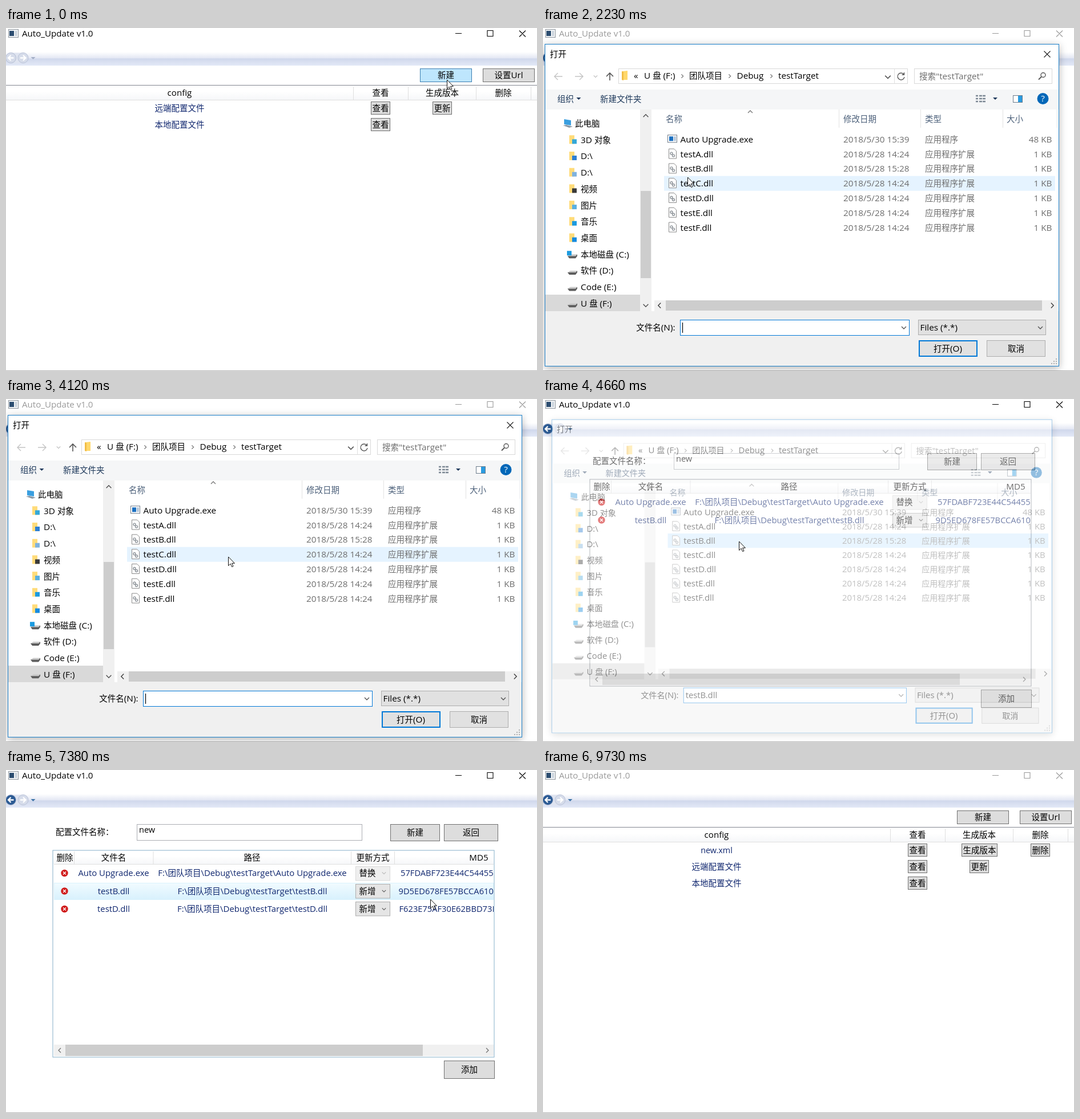
Recreate the animation shown at these times as an HTML page. Size 930 px wide and 602 px high, loop 9810 ms.

```html
<!DOCTYPE html>
<html lang="zh-CN">
<head>
<meta charset="utf-8">
<title>Auto_Update</title>
<style>
html,body{margin:0;width:100%;height:100%;overflow:hidden;background:#fff}
svg{display:block;width:100vw;height:100vh}
text{font:15.1px "Open Sans","Noto Sans CJK SC",sans-serif;white-space:pre}
#dialog text{font-size:15.3px}
.c{font:14.5px "Noto Sans CJK SC","Noto Sans CJK",sans-serif}
.m{text-anchor:middle}
.e{text-anchor:end}
.navy{fill:#10276f}
#editor .navy{font-size:14.9px}
#editor .hash{font-size:14.7px}
.gray{fill:#6d6d6d}
.head{fill:#4c607a}
.tool{fill:#1e395b}
.btn rect{fill:#ddd;stroke:#707070}
.btn.hot rect{fill:#bee6fd;stroke:#3c7fb1}
.combo rect{fill:#e5e5e5;stroke:#acacac}
.combo.hot rect{fill:#dcecfc;stroke:#7eb4ea}
.off rect{fill:#efefef;stroke:#d9d9d9}
.row>rect{fill:none}
.row.hot>rect{fill:url(#glow);stroke:#d9f1fc}
</style>
</head>
<body>
<svg id="stage" viewBox="0 0 930 602" preserveAspectRatio="none"></svg>
<script>
const LOOP = 9810;
const stage = document.getElementById('stage');

// ---- drawing helpers ----
const text = (x, cy, s, cls = '', extra = '') =>
  `<text x="${x}" y="${cy + 5.4}" class="${cls}" ${extra}>` +
  s.replace(/[\u4e00-\u9fff\uff1a]+/g, '<tspan class="c">$&</tspan>') + '</text>';
const box = (x, y, w, h, fill, stroke = 'none', extra = '') =>
  `<rect x="${x}" y="${y}" width="${w}" height="${h}" fill="${fill}" stroke="${stroke}" ${extra}/>`;
const line = (d, color = '#dfdfdf', w = 1) =>
  `<path d="${d}" fill="none" stroke="${color}" stroke-width="${w}"/>`;
const chev = (x, y, turn = 0, color = '#505050', k = 1) =>
  `<path d="M-4-2L0 2L4-2" transform="translate(${x} ${y}) rotate(${turn}) scale(${k})" fill="none" stroke="${color}" stroke-width="1.3"/>`;
const tri = (x, y, color, id = '') =>
  `<path ${id && `id="${id}"`} d="M${x - 4} ${y - 2}h8l-4 4z" fill="${color}"/>`;
const btn = (x, y, w, h, label) =>
  `<g class="btn">${box(x + .5, y + .5, w, h, '')}${text(x + w / 2 + .5, y + h / 2 + .5, label, 'm')}</g>`;

// ---- main window ----
const frame = () => `
  ${box(0, 0, 930, 602, '#fff')}
  ${box(4.5, 2.5, 17, 14, '#f1f3f5', '#8d959d')}${box(6, 5, 8, 9, '#2c4d70')}${box(16, 5, 3, 9, '#c6d0da')}
  <g id="caption">${text(28, 10, 'Auto_Update v1.0')}
    <path d="M787 9.5h11M843 4.5h10v10h-10zM899 4.5l11 11M910 4.5l-11 11" fill="none" stroke-width="1.1"/></g>
  ${box(0, 42, 930, 24, 'url(#band)')}
  ${box(8, 43.5, 23, 18, '#dfe4f0')}
  <g id="back" transform="translate(8.5 52.5)" stroke="#b3bdd4"><circle r="9"/>${line('M5 0H-4M0-4.5L-4.5 0L0 4.5', '#fff', 2.3)}</g>
  <g transform="translate(30 52.5)"><circle r="9" fill="#d6dcea" stroke="#b9c2d8"/>${line('M-5 0H4M0-4.5L4.5 0L0 4.5', '#fff', 2.3)}</g>
  ${tri(47.5, 53, '', 'drop')}
  ${box(0, 601, 930, 1, '#b4b4b4')}`;

function listPage(id, rows) {
  const cols = [0, 656, 764, 871];
  let s = `<g id="${id}">${btn(725, 71, 90, 23, '新建')}${btn(835, 71, 90, 23, '设置Url')}
    ${line('M0 100.5H930', '#828790')}${box(0, 101, 930, 25, 'url(#bar)')}
    ${line('M0 126.5H930M608.5 103V126M704.5 103V126M823.5 103V126M919.5 103V126')}
    ${text(304, 114, 'config', 'm')}${text(656, 114, '查看', 'm')}${text(764, 114, '生成版本', 'm')}${text(871, 114, '删除', 'm')}`;
  rows.forEach(([name, ...acts], i) => {
    const y = 141 + Math.floor(i * 29.4);
    s += text(304, y, name, 'm navy', /xml/.test(name) ? 'style="font-size:14.4px"' : '');
    acts.forEach((a, j) => {
      const w = a.length > 2 ? 62 : 33;
      s += btn(Math.floor(cols[j + 1] - w / 2), y - 12, w, 22, a);
    });
  });
  return s + '</g>';
}

const DIR = 'F:\\团队项目\\Debug\\testTarget\\';
const ITEMS = [
  ['Auto Upgrade.exe', '替换', '57FDABF723E44C54455E', 691],
  ['testB.dll', '新增', '9D5ED678FE57BCCA610', 687.5],
  ['testD.dll', '新增', 'F623E75AF30E62BBD73E', 688.5]
];

function itemRow([name, mode, hash, hx], i) {
  const y = 181 + i * 31.5, top = 169 + i * 31, off = i === 0;
  return `<g class="row" id="item${i}">${box(84.5, top - 1.5, 769, 29, '')}
    <circle class="del" cx="102.5" cy="${y}" r="6.2"/>${line(`M100 ${y - 2.5}l5 5m0-5l-5 5`, '#fff', 1.4)}
    ${text(188.5, y, name, 'm navy')}${text(431.5, y, DIR + name, 'm navy')}
    <g class="combo ${off ? 'off' : ''}">${box(612.5, top + .5, 60, 24.5, '')}${text(618.5, y, mode)}
    ${chev(662, y, 0, off ? '#b5b5b5' : '#505050', .8)}</g>
    <g clip-path="url(#cell)">${text(hx, y, hash, 'navy hash', `id="hash${i}"`)}</g></g>`;
}

const editor = () => `<g id="editor">
  ${text(87, 109, '配置文件名称：')}
  ${box(229.5, 95.5, 394, 28, '#fff', '#abadb3', 'id="field"')}
  ${text(233, 105, '', '', 'id="value" style="font-size:14.5px"')}
  <path id="caret" d="M0 98v15" stroke="#000"/>
  ${btn(673, 95, 86, 29, '新建')}${btn(767, 95, 94, 29, '返回')}
  ${box(82, 141, 773, 363, '#fff', '', 'id="table"')}
  ${box(83, 142, 771, 23, 'url(#bar)')}${line('M84 165.5H854')}
  ${text(103, 154, '删除', 'm')}
  <g id="bare">${line('M119.5 143V165M178.5 143V165M221.5 143V165M294.5 143V165M340.5 143V165')}
    ${text(149, 154, '文件名', 'm')}${text(200, 154, '路径', 'm')}${text(258, 154, '更新方式', 'm')}${text(317, 154, 'MD5', 'm')}</g>
  <g id="filled">${line('M119.5 143V165M258 143V165M604.5 143V165M680.5 143V165')}
    ${text(188.5, 154, '文件名', 'm')}${text(431, 154, '路径', 'm')}${text(642.5, 154, '更新方式', 'm')}${text(828, 154, 'MD5', 'm', 'id="md"')}
    ${box(84, 482, 770, 20, '#f0f0f0')}${box(104, 482, 626, 20, '#cdcdcd', 'none', 'id="thumb"')}
    ${chev(94, 492, 90, '#707070')}${chev(843, 492, -90, '#707070')}</g>
  ${ITEMS.map(itemRow).join('')}
  ${btn(767, 510, 88, 31, '添加')}</g>`;

// ---- file dialog ----
const FILES = ['Auto Upgrade.exe', ...[...'ABCDEF'].map(c => `test${c}.dll`)];
const rowY = i => 195.3 + i * 25.8;

function fileRow(name, i) {
  const y = rowY(i), app = i === 0;
  const icon = app
    ? box(218.5, y - 7.5, 16, 13, '#fff', '#6f7b88') + box(221, y - 5, 7, 8, '#1b6fc0') + box(229, y - 5, 4, 8, '#b5c7da')
    : `<path d="M220.5 ${y - 9}h9l4 4v13h-13z" fill="#fff" stroke="#8a8a8a"/>` +
      `<g fill="none" stroke="#8a9096" stroke-width="1.4"><circle cx="225" cy="${y - 1}" r="2"/><circle cx="228.5" cy="${y + 3}" r="2"/></g>`;
  const time = app ? '30 15:39' : i === 2 ? '28 15:28' : '28 14:24';
  return `<rect class="file" x="212" y="${y - 13}" width="685" height="26"/>${icon}
    ${text(240.5, y, name)}${text(526, y, '2018/5/' + time, 'gray')}
    ${text(669, y, app ? '应用程序' : '应用程序扩展', 'gray')}${text(891.5, y, app ? '48 KB' : '1 KB', 'e gray')}`;
}

function sidebar() {
  const tints = ['#35a8d8', '#2d7fd3', '#7fb2de', '#3a3a3a', '#5ab0e0', '#1b9ae0', '#168be0'];
  const names = ['3D 对象', 'D:\\', 'D:\\', '视频', '图片', '音乐', '桌面', '本地磁盘 (C:)', '软件 (D:)', 'Code (E:)', 'U 盘 (F:)'];
  let s = box(4, 468, 166, 29, '#d9d9d9') + text(56, 167.5, '此电脑') +
    `<path d="M37 160l12 2v9l-12-2z" fill="#3a9fe0"/><path d="M35 171l6-1 11 3-6 2z" fill="#8a98a5"/>`;
  names.forEach((n, i) => {
    const y = 196.3 + i * 28.7;
    s += text(66, y, n);
    s += i < 7
      ? box(46, y - 8, 9, 15, '#ffdc7a') + box(51, y - 1, 8, 8, tints[i])
      : `<path d="M43 ${y + 3}l5-3h12l-3 3z" fill="#c9c9c9"/><path d="M43 ${y + 3}l3 4h11l3-4v-3l-3 3z" fill="#5d5d5d"/>` +
        (i === 7 ? box(42, y - 6, 8, 8, '#1c9be0') : '');
  });
  return s;
}

const dialog = () => `<g id="dialog">
  ${box(3.5, 28.5, 900, 565, '#fff', '#1f7fc8', 'filter="url(#shade)"')}
  ${text(12, 46, '打开')}<g id="cross">${line('M877.5 40.5l11 11m0-11l-11 11', '#222', 1.2)}</g>
  ${line('M34 85H20m6-6l-6 6l6 6M56 85h14m-6-6l6 6l-6 6', '#c4c4c4', 1.4)}${chev(92, 85, 0, '#b5b5b5', .8)}
  ${line('M117 92V79m-6 6l6-6l6 6', '#555', 1.6)}
  ${box(132.5, 71.5, 506, 26, '#fff', '#d9d9d9')}${line('M615.5 72V97')}
  <path d="M138 76l10-1v16h-10z" fill="#ffd86b"/><path d="M138 76l3 1v15l-3-1z" fill="#f2bd45"/>
  ${text(159, 84, '«')}${text(177, 84, 'U 盘 (F:)')}${text(256, 84, '团队项目')}${text(339.5, 84, 'Debug')}${text(412, 84, 'testTarget')}
  ${[244, 327, 400].map(x => chev(x, 84.5, -90, '#555', .8)).join('')}${chev(604, 86, 0, '#555', 1.2)}
  ${line('M632 81.5A6 6 0 1 0 633 86M632.5 78v4h-4', '#555', 1.4)}
  ${box(650.5, 71.5, 241, 26, '#fff', '#d9d9d9')}${text(659, 84.5, '搜索"testTarget"', 'gray')}
  <circle cx="876" cy="82.5" r="4" fill="none" stroke="#555" stroke-width="1.4"/>${line('M873 85.5l-5 5', '#555', 1.8)}
  ${box(4, 108, 899, 35, '#f5f6f7')}
  ${text(25, 124.5, '组织', 'tool')}${tri(62.5, 124, '#1e395b')}${text(100, 124.5, '新建文件夹', 'tool')}
  ${[119, 124, 129].map(y => line(`M758 ${y}h4m2 0h5m1 0h5`, '#7c8894', 2.4)).join('')}${tri(792, 124, '#1e395b')}
  ${box(823.5, 118.5, 16, 12, '#fff', '#6d7d8c')}${box(832, 119, 7, 11, '#2a9be0')}
  <circle cx="875.5" cy="124" r="10" fill="#0067b8"/>${text(875.5, 124, '?', 'm', 'fill="#fff" font-weight="600"')}
  ${sidebar()}
  ${box(170, 143, 20, 354, '#f0f0f0')}${box(171, 286, 18, 153, '#cdcdcd')}
  ${chev(180, 154, 180, '#505050', 1.1)}${chev(180, 487, 0, '#505050', 1.1)}
  ${line('M518.5 143V175M661.5 143V175M805.5 143V175M900.5 143V175', '#e3e3e3')}${chev(363, 147, 180, '#777')}
  ${text(215, 159.5, '名称', 'head')}${text(526, 159.5, '修改日期', 'head')}${text(669, 159.5, '类型', 'head')}${text(812, 159.5, '大小', 'head')}
  ${FILES.map(fileRow).join('')}
  ${box(195, 478, 707, 19, '#f0f0f0')}${box(215, 478, 659, 18, '#cdcdcd')}
  ${chev(204, 487, 90, '#404040', 1.1)}${chev(892, 487, -90, '#404040', 1.1)}
  ${box(4, 497, 899, 96, '#f0f0f0')}
  ${text(231.5, 526, '文件名(N):', 'e')}
  ${box(240.5, 512.5, 401, 27, '#fff', '#0078d7')}${chev(632, 526)}
  ${text(244, 526, '', '', 'id="picked"')}<path id="dlgCaret" d="M244.5 517v18" stroke="#000" stroke-width="1.2"/>
  ${box(657.5, 512.5, 223, 26, '#e1e1e1', '#adadad')}${text(660.5, 526, 'Files (*.*)')}${chev(871, 526)}
  ${box(659, 549, 101, 27, '#e1e1e1', '#0078d7', 'stroke-width="2"')}${text(709, 562.5, '打开(O)', 'm')}
  ${box(777.5, 548.5, 102, 28, '#e1e1e1', '#adadad')}${text(828.5, 562.5, '取消', 'm')}
  ${line('M898 581h2m-6 4h2m2 0h2m-10 4h2m2 0h2m2 0h2', '#b0b0b0', 2)}
</g>`;

stage.innerHTML = `<defs>
  <linearGradient id="band" x2="0" y2="1"><stop stop-color="#fff"/><stop offset=".44" stop-color="#e4e8f4"/>
    <stop offset=".5" stop-color="#d0d8ec"/><stop offset="1" stop-color="#e3e9f7"/></linearGradient>
  <linearGradient id="bar" x2="0" y2="1"><stop offset=".4" stop-color="#fff"/><stop offset="1" stop-color="#f6f7f9"/></linearGradient>
  <linearGradient id="glow" x2="0" y2="1"><stop stop-color="#f1fbff"/><stop offset="1" stop-color="#d8f1fd"/></linearGradient>
  <clipPath id="cell"><rect x="681" y="166" width="173" height="310"/></clipPath>
  <filter id="shade" x="-10%" y="-10%" width="120%" height="120%"><feDropShadow dx="0" dy="3" stdDeviation="7" flood-opacity=".3"/></filter>
  </defs>` + frame() +
  listPage('before', [['远端配置文件', '查看', '更新'], ['本地配置文件', '查看']]) +
  listPage('after', [['new.xml', '查看', '生成版本', '删除'], ['远端配置文件', '查看', '更新'], ['本地配置文件', '查看']]) +
  editor() + dialog() +
  `<path id="arrow" d="M.5 0V15.6L4.2 12.2L6.6 17.6L9 16.6L6.6 11.3H11.4Z" fill="#fff" stroke="#111"/>
   <path id="beam" d="M-3-8h2.5l.5.5.5-.5H3M0-7.5V7.5M-3 8h2.5l.5-.5.5.5H3" fill="none" stroke="#222"/>`;

const $ = id => document.getElementById(id);
const show = (id, on) => $(id).style.display = on ? '' : 'none';
const set = (id, key, v) => $(id).setAttribute(key, v);

// ---- timeline ----
// bursts of screen updates: start, end, count
const BURSTS = [[0, 0, 1], [120, 280, 3], [430, 520, 2], [750, 1670, 13], [1740, 2460, 10], [2860, 2860, 1],
  [3010, 3960, 13], [4030, 4960, 13], [5040, 5970, 13], [6050, 6050, 1], [6220, 6520, 5], [6900, 7830, 13],
  [7930, 7930, 1], [8080, 8080, 1], [8310, 8780, 7], [8930, 9490, 8], [9650, 9730, 2]];
// pointer: time, x, y
const PATH = [[120, 772, 91], [280, 420, 108], [430, 400, 110], [520, 400, 118], [980, 400, 118], [1240, 780, 545],
  [1400, 808, 526], [1740, 808, 526], [2220, 253, 262], [2460, 300, 190], [3050, 300, 190], [3406, 845, 509],
  [3560, 815, 525], [3720, 815, 525], [4200, 343, 250], [4650, 343, 250], [4960, 800, 522], [5500, 805, 525],
  [5970, 273, 287], [6050, 271, 286], [6950, 271, 286], [7365, 743, 227], [7680, 645, 236], [7830, 626, 244],
  [7930, 624, 250], [8080, 625, 257], [8310, 625, 257], [8700, 712, 108], [8930, 712, 108], [9490, 772, 84],
  [9650, 800, 62]];
const DIALOGS = [
  {open: 1700, pick: 2860, close: 2990, file: 0, shift: 0},
  {open: 3690, pick: 4300, close: 4535, file: 2, shift: 0},
  {open: 5440, pick: 6220, close: 6880, file: 4, shift: 1}
];
const FADE = 200;

function snap(t) {
  const [a, b, n] = BURSTS.filter(r => t >= r[0]).pop();
  if (n < 2) return a;
  const step = (b - a) / (n - 1);
  return a + step * Math.min(n - 1, Math.floor((t - a) / step + .22));
}

function pointer(t) {
  const j = PATH.findIndex(p => p[0] >= t);
  if (j < 1) return (j ? PATH[PATH.length - 1] : PATH[0]).slice(1);
  const [t0, x0, y0] = PATH[j - 1], [t1, x1, y1] = PATH[j];
  const p = (t - t0) / (t1 - t0), k = p * p * (3 - 2 * p);
  return [x0 + (x1 - x0) * k, y0 + (y1 - y0) * k];
}

const within = (x, y, r) => x >= r.x && x <= r.x + r.w && y >= r.y && y <= r.y + r.h;
const hots = [...stage.querySelectorAll('.btn,.combo:not(.off),.row')].map(g => {
  const r = g.querySelector('rect'), num = k => +r.getAttribute(k);
  return {g, x: num('x'), y: num('y'), w: num('width'), h: num('height')};
});
const files = [...stage.querySelectorAll('.file')];
const dels = [...stage.querySelectorAll('.del')];

function drawDialog(d, t, x, y) {
  const grow = 1 - Math.pow(1 - Math.min(1, (t - d.open) / 240), 3);
  const fade = Math.max(0, (t - d.close) / FADE);
  const k = t < d.close ? .92 + .08 * grow : 1 - .047 * fade;
  set('dialog', 'opacity', t < d.close ? grow : 1 - fade);
  set('dialog', 'transform', `translate(${453.5 + d.shift} ${311 + d.shift}) scale(${k}) translate(-453.5 -311)`);
  const picked = t >= d.pick, top = y - d.shift;
  files.forEach((f, i) => {
    const over = x > 212 && x < 897 && Math.abs(top - rowY(i)) < 12.9;
    f.setAttribute('fill', picked && i === d.file ? '#cce8ff' : over ? '#e5f3ff' : 'none');
  });
  $('picked').textContent = picked ? FILES[d.file] : '';
  show('dlgCaret', !picked);
  show('cross', t < d.close);
}

function render(now) {
  const t = snap(now % LOOP);
  const [x, y] = pointer(t);
  const d = DIALOGS.find(v => t >= v.open && t < v.close + FADE);
  const blocked = DIALOGS.some(v => t >= v.open - 40 && t < v.close);
  const count = DIALOGS.filter(v => t >= v.close).length;
  const editing = t >= 120 && t < 8930;

  show('before', t < 120);
  show('after', t >= 8930);
  show('editor', editing);
  const ink = blocked || t >= 9650 ? '#999' : '#000';
  set('caption', 'fill', ink);
  $('caption').querySelector('path').setAttribute('stroke', ink);
  set('back', 'fill', t < 120 ? '#d6dcea' : '#2c5b94');
  set('drop', 'fill', t < 120 ? '#a4afc6' : '#3f74a8');

  const inField = editing && within(x, y, {x: 229, y: 95, w: 394, h: 29});
  const focused = t >= 520 && t < 1440;
  const typed = 'new'.slice(0, t < 750 ? 0 : 1 + Math.floor((t - 745) / 76));
  $('value').textContent = typed;
  show('caret', focused);
  set('caret', 'transform', `translate(${[233.5, 242.5, 250.5, 262.5][typed.length]} 0)`);
  set('field', 'stroke', focused || inField && !blocked ? '#569de5' : '#abadb3');

  show('bare', count === 0);
  show('filled', count > 0);
  ITEMS.forEach((_, i) => show('item' + i, i < count));
  dels.forEach(c => c.setAttribute('fill', count < 2 ? '#9c2408' : '#d01c1c'));
  set('md', 'x', count < 2 ? 824 : 828);
  set('hash0', 'x', count < 2 ? 687.5 : 691);
  set('thumb', 'width', count < 2 ? 632 : 626);
  set('table', 'stroke', d || t < 3000 ? '#828790' : '#86b0ca');
  hots.forEach(h => h.g.classList.toggle('hot', !d && !blocked && t < 9650 && within(x, y, h)));

  show('dialog', !!d);
  if (d) drawDialog(d, t, x, y);

  const beam = inField && !d;
  show('beam', beam);
  show('arrow', !beam && t < 9725);
  set(beam ? 'beam' : 'arrow', 'transform', `translate(${Math.round(x)} ${Math.round(y)})`);
}

const start = performance.now();
function tick() {
  render(performance.now() - start);
  requestAnimationFrame(tick);
}
tick();
</script>
</body>
</html>
```
